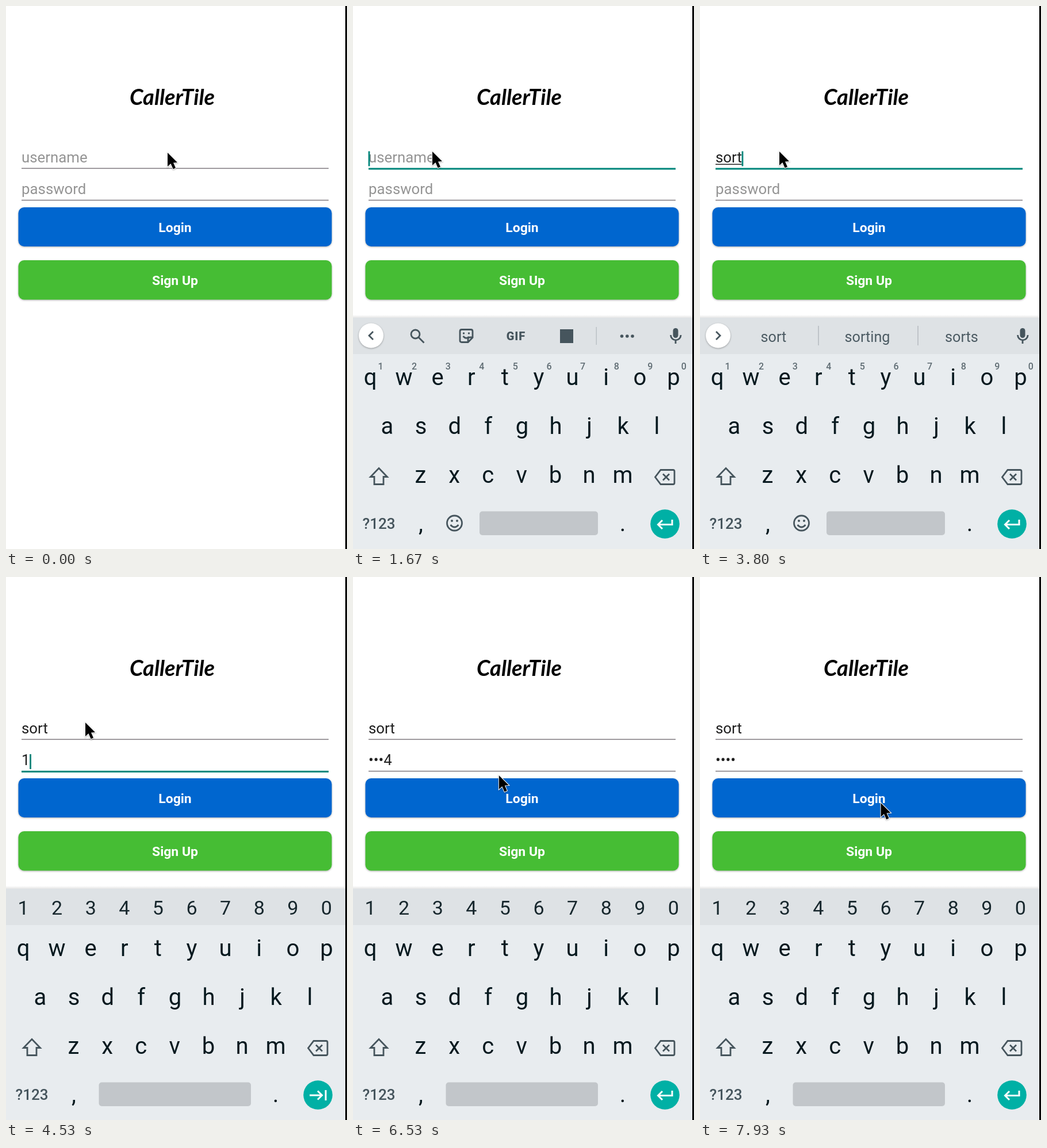
An HTML page for the animation above (8 s loop, 593 by 944 pixels).

```html
<!DOCTYPE html>
<html lang="en">
<head>
<meta charset="utf-8">
<title>Login screen</title>
<style>
  html, body { margin: 0; width: 100%; height: 100%; overflow: hidden; background: #fff; }
  svg { display: block; width: 100%; height: 100%; }
  text { font-family: Roboto, sans-serif; white-space: pre; }
  .brand { font: italic 700 38px Lato, sans-serif; }
  .field { font-size: 25.84px; }
  .button { font-size: 22.97px; font-weight: 700; fill: #fff; }
  .raised { filter: drop-shadow(0 1px 1.4px rgba(0,0,0,.32)); }
  .key { font-size: 40px; fill: #07191f; }
  .digit { font-size: 34px; fill: #17272d; }
  .hint { font-size: 16px; font-weight: 500; fill: #5f6c73; }
  .word { font-size: 25.2px; fill: #4c5b63; }
  .icon { fill: none; stroke: #46555d; stroke-width: 2.8; }
  .solid { fill: #46555d; }
  .white { fill: none; stroke: #fff; stroke-width: 3; }
</style>
</head>
<body>
<svg viewBox="0 0 593 944" preserveAspectRatio="none">
  <defs>
    <clipPath id="loginShape"><rect x="21.5" y="350" width="545" height="68" rx="10"/></clipPath>
    <linearGradient id="edge" x2="0" y2="1">
      <stop offset="0" stop-opacity="0"/><stop offset="1" stop-opacity=".1"/>
    </linearGradient>
  </defs>
  <rect width="593" height="944" fill="#fff"/>
  <text class="brand" x="289" y="172" text-anchor="middle">CallerTile</text>

  <text id="userText" class="field" x="27" y="272"></text>
  <rect id="composing" x="27" y="274.5" height="1.5" fill="#222"/>
  <rect id="userLine" x="27" width="534"/>
  <text id="passText" class="field" x="27" y="327"></text>
  <rect id="passLine" x="27" width="534"/>
  <rect id="caret" width="2.8" height="26" fill="#00857a"/>

  <rect class="raised" x="21.5" y="350" width="545" height="68" rx="10" fill="#0066cf"/>
  <text class="button" x="294" y="393" text-anchor="middle">Login</text>
  <g id="press" clip-path="url(#loginShape)">
    <rect x="21" y="349" width="546" height="70" fill-opacity=".06"/>
    <circle id="ripple" cx="314" cy="393" fill-opacity=".07"/>
  </g>
  <rect class="raised" x="21.5" y="442" width="545" height="68.5" rx="10" fill="#46bd34"/>
  <text class="button" x="294" y="485" text-anchor="middle">Sign Up</text>

  <g id="keyboard">
    <rect y="537" width="590" height="5" fill="url(#edge)"/>
    <rect y="542" width="590" height="402" fill="#e8ecef"/>
    <rect y="542" width="590" height="63" fill="#dee2e5"/>
    <g id="keys"></g>
    <g id="digits"></g>
    <g id="hints"></g>

    <g id="stripe">
      <circle class="raised" cx="31.5" cy="573" r="21.5" fill="#fff"/>
      <path id="chevron" class="icon"/>
      <rect class="solid" x="556.5" y="560" width="9" height="17" rx="4.5"/>
      <path class="icon" stroke-width="2.4" d="M552.5 572a8.8 8.8 0 0 0 17.6 0M561 581v6"/>
    </g>
    <g id="tools">
      <circle class="icon" cx="108.500" cy="570.500" r="7.5"/>
      <path class="icon" d="M114 576l9.500 9.500"/>
      <path class="icon" d="M189 562.500h16q3 0 3 3v11l-8 8h-11q-3 0-3-3v-16q0-3 3-3zM208 576h-5q-3 0-3 3v5M191.500 574q5 6 10 1"/>
      <circle class="solid" cx="192.500" cy="569" r="1.7"/><circle class="solid" cx="201.500" cy="569" r="1.7"/>
      <text class="solid" x="283.500" y="580.500" text-anchor="middle" font-size="20" font-weight="900" letter-spacing="1">GIF</text>
      <rect class="solid" x="360" y="562" width="23" height="24"/>
      <rect x="422.500" y="558" width="1.5" height="31" fill="#bbc1c5"/>
      <circle class="solid" cx="467.500" cy="574" r="2.8"/><circle class="solid" cx="476.800" cy="574" r="2.8"/><circle class="solid" cx="486" cy="574" r="2.8"/>
    </g>
    <g id="suggestions" text-anchor="middle">
      <text class="word" x="128" y="584">sort</text>
      <text class="word" x="291" y="584">sorting</text>
      <text class="word" x="455" y="584">sorts</text>
      <path d="M206 556v34M379 556v34" stroke="#b5bbc0" stroke-width="1.5"/>
    </g>

    <path class="icon" d="M45 803.500L59.500 818.500H53V831.500H37V818.500H30.500Z"/>
    <path class="icon" d="M535 806.500H556.500q2.500 0 2.500 2.500V829q0 2.500-2.500 2.500H535L525.500 819ZM539 813.500l11 11M550 813.500l-11 11"/>
    <text x="45" y="909" text-anchor="middle" font-size="26" font-weight="500" fill="#46555d">?123</text>
    <g id="smiley">
      <circle class="icon" cx="176.500" cy="899" r="13"/>
      <path class="icon" d="M169.500 902q7 8 14 0"/>
      <circle class="solid" cx="172" cy="895" r="2"/><circle class="solid" cx="181" cy="895" r="2"/>
    </g>
    <rect id="space" y="878.500" height="41.500" rx="5" fill="#c2c6ca"/>
    <circle cx="542.500" cy="900.500" r="25.300" fill="#00b0a5"/>
    <path id="enterIcon" class="white" d="M555 893v8.500H531M538 894l-7.500 7.500l7.500 7.500"/>
    <path id="nextIcon" class="white" d="M528 901h21M542 893.500l7.500 7.500l-7.500 7.500M556 892v18"/>
  </g>

  <path id="pointer" d="M0 0V24L5.500 19L9.700 28.500L14 26.500L10 17.500L17 17Z" stroke="#fff" stroke-width="2" paint-order="stroke"
        style="filter:drop-shadow(0 1px 1px rgba(0,0,0,.3))"/>
  <rect x="590" width="3" height="944"/>
</svg>
<script>
const LOOP = 8000;
const USER = 'sort', PASS = '1234';
const USER_TYPED = [3400, 3520, 3620, 3740];
const PASS_TYPED = [4500, 4700, 4900, 5100];
const USER_FOCUS = 1250, PASS_FOCUS = 4110, FOCUS_LOST = 6400, MASKED = 6600;
const KEYBOARD_START = 1520, KEYBOARD_END = 1660;
const PRESS = 7200, RELEASE = 7430;
const COLUMN = 58.6;

const el = {};
document.querySelectorAll('[id]').forEach(node => el[node.id] = node);

const row = (chars, x, y, cls) => [...chars].map((c, i) =>
  `<text class="${cls}" x="${x + i * COLUMN}" y="${y}" text-anchor="middle">${c}</text>`).join('');
el.keys.innerHTML = row('qwertyuiop', 30, 659, 'key') + row('asdfghjkl', 59.5, 744, 'key') +
  row('zxcvbnm', 117.5, 829, 'key') + row(',', 118, 913, 'key') + row('.', 469, 913, 'key');
el.digits.innerHTML = row('1234567890', 30, 587, 'digit');
el.hints.innerHTML = row('1234567890', 48, 631.5, 'hint');

const set = (node, attrs) => Object.entries(attrs).forEach(([k, v]) => node.setAttribute(k, v));
const show = (node, on) => node.style.display = on ? '' : 'none';
const progress = (t, from, to) => Math.min(1, Math.max(0, (t - from) / (to - from)));
const ease = p => (1 - Math.cos(Math.PI * p)) / 2;
const countTyped = (times, t) => times.filter(time => time <= t).length;

function setField(text, line, value, hint, focused, lineY) {
  text.textContent = value || hint;
  set(text, { fill: value ? '#1f1f1f' : '#959595' });
  set(line, focused ? { y: lineY, height: 3, fill: '#00857a' } : { y: lineY, height: 1.6, fill: '#858085' });
}

function drawFields(t) {
  const inUser = t >= USER_FOCUS && t < PASS_FOCUS;
  const inPass = t >= PASS_FOCUS && t < FOCUS_LOST;
  const user = USER.slice(0, countTyped(USER_TYPED, t));
  const count = countTyped(PASS_TYPED, t);
  const pass = count === 0 ? '' : t >= MASKED ? '•'.repeat(count) : '•'.repeat(count - 1) + PASS[count - 1];
  setField(el.userText, el.userLine, user, 'username', inUser, 281.5);
  setField(el.passText, el.passLine, pass, 'password', inPass, 336.8);

  const userWidth = user ? el.userText.getComputedTextLength() : 0;
  show(el.composing, inUser && user);
  set(el.composing, { width: userWidth });

  const edits = [USER_FOCUS, ...USER_TYPED, PASS_FOCUS, ...PASS_TYPED].filter(time => time <= t);
  const sinceEdit = t - edits[edits.length - 1];
  show(el.caret, (inUser || inPass) && sinceEdit % 1000 < 500);
  const width = inUser ? userWidth : pass ? el.passText.getComputedTextLength() : 0;
  set(el.caret, { x: 26.6 + width, y: inUser ? 252.5 : 308 });
}

function drawKeyboard(t) {
  const rise = 1 - (1 - progress(t, KEYBOARD_START, KEYBOARD_END)) ** 2;
  show(el.keyboard, rise > 0);
  set(el.keyboard, { transform: `translate(0 ${407 * (1 - rise)})` });
  const passwordMode = t >= PASS_FOCUS;
  const suggesting = t >= USER_TYPED[0] + 30;
  show(el.digits, passwordMode);
  show(el.hints, !passwordMode);
  show(el.smiley, !passwordMode);
  show(el.stripe, !passwordMode);
  show(el.tools, !passwordMode && !suggesting);
  show(el.suggestions, !passwordMode && suggesting);
  set(el.chevron, { d: suggesting ? 'M28 566l7 7l-7 7' : 'M35 566l-7 7l7 7' });
  const spaceX = passwordMode ? 161.5 : 220;
  set(el.space, { x: spaceX, width: 426 - spaceX });
  const next = passwordMode && t < FOCUS_LOST;
  show(el.nextIcon, next);
  show(el.enterIcon, !next);
}

function drawPointer(t) {
  const first = progress(t, 0, 1030), a = ease(first), b = ease(progress(t, 6050, 6850));
  const x = 281 - 143 * a + 176.5 * b;
  const y = 255 - 2 * a + 4 * Math.sin(Math.PI * first) + 140 * b;
  set(el.pointer, { transform: `translate(${x} ${y})` });
}

function drawPress(t) {
  show(el.press, t >= PRESS);
  set(el.press, { opacity: progress(t, PRESS, PRESS + 70) * (1 - progress(t, RELEASE, 7880)) });
  set(el.ripple, { r: 1.3 * Math.max(0, t - PRESS) });
}

const start = performance.now();
function frame() {
  const t = (performance.now() - start) % LOOP;
  drawFields(t);
  drawKeyboard(t);
  drawPointer(t);
  drawPress(t);
  requestAnimationFrame(frame);
}
frame();
</script>
</body>
</html>
```
